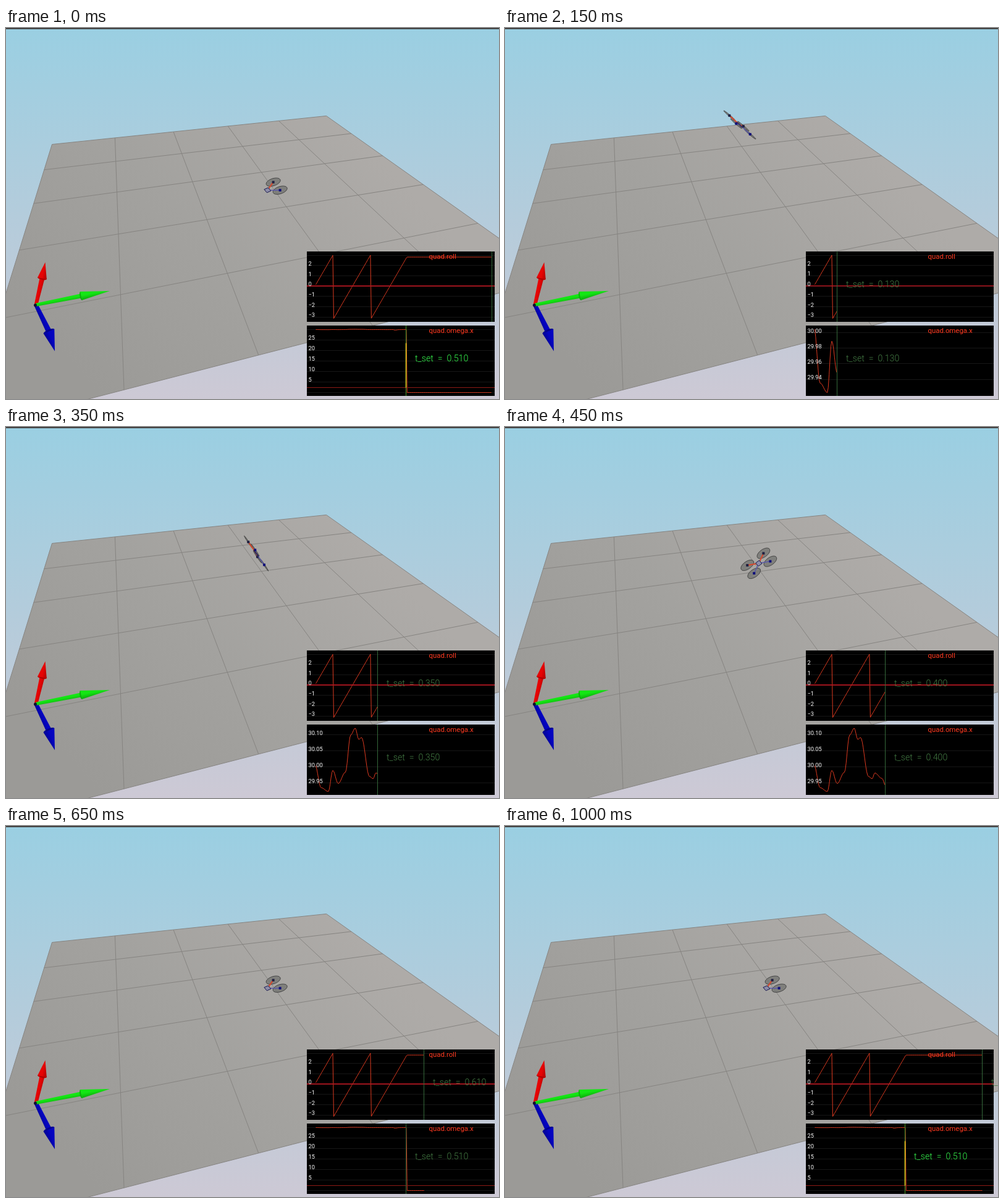
Recreate the animation shown at these times as an HTML page with a canvas. Size 798 px wide and 601 px high, loop 1050 ms.

```html
<!DOCTYPE html>
<html>
<head>
<meta charset="utf-8">
<style>
html, body { margin: 0; overflow: hidden; }
canvas { display: block; }
</style>
</head>
<body>
<canvas id="stage" width="798" height="601"></canvas>
<script>
const ctx = document.getElementById('stage').getContext('2d');
const FONT = 'Roboto, "Liberation Sans", sans-serif';
const SLOT = 50, SLOTS = 21;
const IMPACT = .51;

const timeX = s => 499.5 + 290 * s;
const angle = s => Math.min(30 * s, 15.4);
const wrap = a => Math.atan2(Math.sin(a), Math.cos(a));
const linear = k => k;
const smooth = k => (1 - Math.cos(Math.PI * k)) / 2;

// Value at x on a curve through key points
function follow(keys, x, ease) {
  const i = Math.max(1, keys.findIndex(k => k[0] >= x));
  const [x0, y0] = keys[i - 1], [x1, y1] = keys[i];
  return y0 + (y1 - y0) * ease((x - x0) / (x1 - x0));
}

// Simulation time by slot; the picture holds twice
const pace = [[1, .03], [3, .13], [5, .25], [7, .35], [8, .35], [9, .4],
  [17, .82], [18, .82], [20, .94], [21, .99]];

// Spin noise: time, deviation from 30 in 1/1000
const wobble = [[0, 8], [.035, -65], [.075, -77], [.1, -11], [.13, -52], [.17, -17],
  [.2, 100], [.225, 121], [.245, 86], [.26, 92], [.305, -30], [.325, -37],
  [.34, -19], [.38, -36], [.4, -58], [.436, -30], [.447, -290], [.47, -60], [IMPACT, 0]];

const sample = f => Array.from({ length: 197 }, (_, i) => {
  const s = .005 * (i + 1);
  return [timeX(s), f(s)];
});
const roll = sample(s => wrap(angle(s)));
const omega = sample(s => s > IMPACT ? 0 : 30 + follow(wobble, s, smooth) / 1000);

function path(points, close) {
  ctx.beginPath();
  points.forEach(([x, y]) => ctx.lineTo(x + .5, y + .5));
  if (close) ctx.closePath();
}
function stroke(color, width = 1) {
  ctx.strokeStyle = color;
  ctx.lineWidth = width;
  ctx.stroke();
}
function line(points, color, width) {
  path(points);
  stroke(color, width);
}
function fill(points, color) {
  path(points, true);
  ctx.fillStyle = color;
  ctx.fill();
}
function text(str, x, y, size, color, weight) {
  ctx.font = `${weight} ${size}px ${FONT}`;
  ctx.fillStyle = color;
  ctx.fillText(str, x, y);
}
function gradient(x0, y0, x1, y1, ...colors) {
  const g = ctx.createLinearGradient(x0, y0, x1, y1);
  colors.forEach((c, i) => g.addColorStop(i / (colors.length - 1), c));
  return g;
}

// Perspective view of the unit square floor
function floor(u, v) {
  const w = 1 + .191 * u - .611 * v;
  return [(74 + 543 * u - 101.2 * v) / w, (188 - 19 * u + 66 * v) / w];
}

function drawArrow([x0, y0], [x1, y1], [x2, y2], shaft, head, dark, light) {
  const len = Math.hypot(x2 - x0, y2 - y0);
  const nx = -(y2 - y0) / len, ny = (x2 - x0) / len;
  const side = (x, y, w) => [x + nx * w, y + ny * w];
  const shade = gradient(...side(x1, y1, -head), ...side(x1, y1, head), light, light, dark);
  fill([side(x0, y0, -shaft * .7), side(x1, y1, -shaft), side(x1, y1, shaft), side(x0, y0, shaft * .7)], shade);
  ctx.beginPath();
  ctx.ellipse(x1 + .5, y1 + .5, head, head * .3, Math.atan2(ny, nx), 0, 7);
  ctx.fillStyle = dark;
  ctx.fill();
  fill([side(x1, y1, -head), [x2, y2], side(x1, y1, head)], shade);
}

function drawScene() {
  ctx.fillStyle = gradient(0, 0, 0, 601, '#9acfe2', '#cdc9d5');
  ctx.fillRect(0, 0, 798, 601);
  ctx.fillStyle = '#444';
  ctx.fillRect(0, 0, 798, 2);

  fill([floor(0, 0), floor(1, 0), floor(1, 1), floor(0, 1)],
    gradient(560, 160, 120, 560, '#aeaba8', '#a3a29f', '#9b9a97'));
  for (let i = 0; i <= 5; i++) {
    line([floor(i / 5, 0), floor(i / 5, 1)], '#868481');
    line([floor(0, i / 5), floor(1, i / 5)], '#868481');
  }

  const origin = [48, 448];
  drawArrow(origin, [58, 405], [63, 379], 4, 7.5, '#b00000', '#e60404');
  drawArrow(origin, [69, 491], [78.5, 523], 4.5, 9.5, '#000090', '#0404c0');
  drawArrow(origin, [121, 433.5], [167.5, 425.5], 3.6, 7, '#0cae0c', '#14e614');
  ctx.beginPath();
  ctx.arc(47.5, 449, 2.5, 0, 7);
  ctx.fillStyle = '#101030';
  ctx.fill();
}

function drawDrone(time) {
  const s = Math.min(time, IMPACT), a = angle(time);
  const cx = 364.7 + 114 * s, cy = 145.5 + 35 * s + 380 * s * s;
  // Projected body axes: u along the roll axis, v across it
  const u = [-5.5, -6.5];
  const v = [15.5 * Math.cos(a), -2.1 * Math.cos(a) + 14.8 * Math.sin(a)];
  const at = (i, j) => [cx + i * u[0] + j * v[0], cy + i * u[1] + j * v[1]];
  const sides = time > .48 ? [-1] : [-1, 1]; // the lower side sinks into the ground
  const rotors = [1, -1].flatMap(i => sides.map(j => [i, j]));

  for (const [i, j] of rotors) {
    fill(Array.from({ length: 32 }, (_, n) => {
      const p = n * Math.PI / 16;
      return at(i + .73 * Math.cos(p), j + .73 * Math.sin(p));
    }), 'rgba(116,117,114,.8)');
    stroke('#3c3c3c', .9);
  }
  for (const [i, j] of rotors) {
    const front = i > 0, [x, y] = at(i, j);
    line([at(0, 0), [x, y]], front ? '#d8482c' : '#5a5aa8', front ? 2 : 1.5);
    ctx.fillStyle = front ? '#202040' : '#10107a';
    ctx.fillRect(x - 1.5, y - 1.5, 4, 4);
  }
  fill([at(.4, .22), at(.4, -.22), at(-.4, -.22), at(-.4, .22)], '#8c8ca8');
  stroke('#18184c');
}

function drawPlot(top, title, data, time, setTime, lit) {
  const now = timeX(time), cursor = Math.floor(timeX(setTime));
  const seen = data.filter(p => p[0] <= now + .1).map(p => p[1]);
  const min = Math.min(...seen), max = Math.max(...seen), range = max - min;
  const toY = v => top + 108 - (v - min) / range * 102.5;
  const across = (y, color, width) => line([[486.5, y], [790.5, y]], color, width);

  ctx.fillStyle = '#000';
  ctx.fillRect(487, top, 304, 114);

  const unit = 10 ** Math.floor(Math.log10(range / 7));
  const step = [1, 2, 5, 10].map(m => m * unit).find(d => range / d <= 7);
  const digits = step < .099 ? 2 : step < .99 ? 1 : 0;
  const labels = [];
  for (let n = Math.ceil(min / step); n * step <= max; n++) {
    const y = toY(n * step);
    across(Math.round(y), '#161616');
    if (y > top + 8 && y < top + 107) labels.push([(n * step).toFixed(digits).replace('-', '−'), y]);
  }

  ctx.save();
  ctx.beginPath();
  ctx.rect(487, top, Math.max(0, now - 486.5), 114);
  ctx.clip();
  line(data.map(([x, v]) => [x, toY(v)]), '#dc3a20');
  ctx.restore();

  if (data === roll) across(toY(0) - .4, '#b0141e', 1.6);
  else if (time > IMPACT) across(top + 100, '#8c1a16');

  line([[cursor, top - .5], [cursor, top + 113.5]], lit ? '#4f9a2c' : '#35683a');
  if (lit) line([[cursor, top + 28], [cursor, top + 100]], '#d8d820', 1.5);

  labels.forEach(([str, y]) => text(str, 489.5, y + .5, 9.2, '#fff', 400));
  text(title, 684.5, top + 12, 11.4, '#ff3a20', 400);
  text(`t_set  =  ${setTime.toFixed(3)}`, cursor + 15, top + 57.5, 14.2, lit ? '#38ff50' : '#447c44', 300);
}

function frame() {
  const slot = Math.floor(performance.now() / SLOT) % SLOTS || SLOTS;
  const time = Math.round(follow(pace, slot, linear) * 100) / 100;
  drawScene();
  drawDrone(time);
  drawPlot(362, 'quad.roll', roll, time, time, false);
  drawPlot(482, 'quad.omega.x', omega, time, Math.min(time, IMPACT), time > .7);
  requestAnimationFrame(frame);
}
frame();
</script>
</body>
</html>
```
